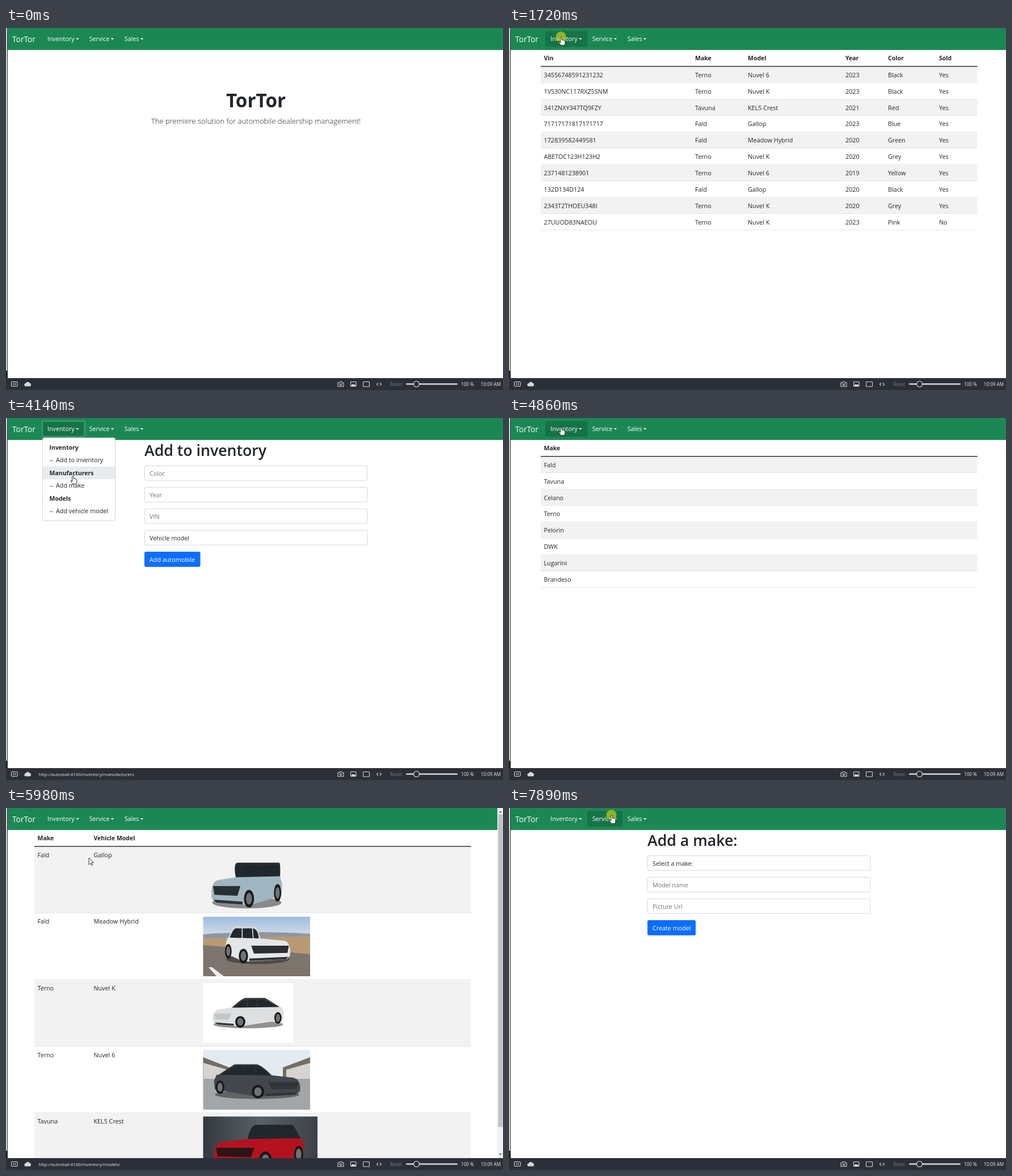
Write an HTML page that moves like this. It is 876x639 px and loops after 7990 ms.

```html
<!DOCTYPE html>
<html lang="en">
<head>
<meta charset="utf-8">
<title>Dealership dashboard</title>
<style>
html, body { margin: 0; width: 100%; height: 100%; overflow: hidden; background: #fff; }
svg { display: block; width: 876px; height: 639px; font: 10.75px "Open Sans", "Noto Sans", sans-serif; fill: #212529; }
text { white-space: pre; }
.b { font-weight: 700; font-size: 10.5px; }
.h { font-weight: 600; font-size: 26.7px; }
.w { fill: #fff; }
.p { fill: #6c757d; }
.s { font-size: 8.1px; fill: #eceef0; }
#link { font-size: 7.8px; }
</style>
</head>
<body>
<svg id="stage" viewBox="0 0 876 639"></svg>
<script>
const LOOP = 7990;

const text = (x, y, s, cls = '', more = '') => `<text x="${x}" y="${y}" class="${cls}" ${more}>${s}</text>`;
const rect = (x, y, w, h, fill, more = '') => `<rect x="${x}" y="${y}" width="${w}" height="${h}" fill="${fill}" ${more}/>`;
const path = (d, fill, more = '') => `<path d="${d}" fill="${fill}" ${more}/>`;
const oval = (x, y, rx, ry, fill, more = '') => `<ellipse cx="${x}" cy="${y}" rx="${rx}" ry="${ry}" fill="${fill}" ${more}/>`;
const group = (id, body) => `<g id="${id}">${body}</g>`;

// Striped rows below a bold header
function table(left, cols, head, rows, pitch) {
  const line = (y, h, c) => rect(left, y, 769.5, h, c);
  return head.map((s, i) => text(cols[i], 57, s, 'b')).join('') +
    rows.map((row, r) => {
      const y = 68 + r * pitch;
      return (r % 2 ? '' : line(y, pitch, '#f2f2f2')) + line(y + pitch - .8, .8, '#dee2e6') +
        row.split('|').map((s, i) => text(cols[i], y + 18.7, s)).join('');
    }).join('') + line(67, 1.4, '#212529');
}

// A leading * marks a select box, which has dark text
function form(title, fields, button, width) {
  const top = i => 84 + i * 38;
  const end = top(fields.length);
  return text(244, 67, title, 'h') +
    fields.map((s, i) =>
      rect(244.4, top(i) + .2, 392.4, 26, '#fff', 'rx="2.6" stroke="#ced4da" stroke-width=".9"') +
      text(253, top(i) + 17.6, s.replace('*', ''), s[0] == '*' ? '' : 'p')).join('') +
    rect(244, end, width, 26.7, '#0d6efd', 'rx="2.6"') + text(253, end + 17.6, button, 'w');
}

// Car facing left in a 100 x 50 box; a negative width flips it.
// hub: front wheel position, more when seen from the front; box: 0 sleek to 1 square.
function car(x, y, w, h, hub, box, body, roof, grille) {
  const base = hub * .6 + 3, front = base + 20 - 18 * box, back = 73 + 22 * box;
  const wheel = (cx, rx, cy) => oval(cx, cy, rx, 9, '#17191b') + oval(cx, cy, rx * .6, 6, '#6d7275');
  const cabin = (inset, fill) => path(
    `M${base + inset} 18Q${front - 6} ${3 + inset} ${front + inset} ${2 + inset}H${back - inset}Q${back + 2} ${3 + inset} ${96 - inset} 18Z`, fill);
  const pillar = k => front + (back - front) * k;
  return `<g transform="translate(${x} ${y}) scale(${w / 100} ${h / 50})">` +
    oval(50, 43, 48, 6, '#222', 'opacity=".5"') + cabin(0, roof) + cabin(2.5, '#20282e') +
    path(`M${pillar(.1)} 3L${pillar(.05)} 18M${pillar(.6)} 3V18`, 'none', `stroke="${roof}" stroke-width="1.5"`) +
    path(`M1 31Q2 22 9 20L${base} 17 96 16 99 24 98 36 ${hub} 46 6 43 1 38Z`, body) +
    path(`M3 26H${hub - 12}L${hub - 16} 36 5 35Z`, grille) +
    path(`M4 40L${hub - 9} 42V45L7 43Z`, '#303336') +
    wheel(86 + hub / 8, 5, 33) + wheel(hub, 7, 39) + '</g>';
}

const photos =
  car(361, 93, 127, 86, 53, 1, '#9fb6c1', '#262c32', '#2a2f33') +
  rect(347.5, 192, 188.5, 105, 'url(#sky)') +
  path('M347.5 223Q440 216 536 222V250H347.5Z', '#8d96a2') +
  path('M347.5 230L536 226V260L347.5 246Z', '#b79a74') +
  path('M347.5 242L536 258V297H347.5Z', '#7d756d') + path('M357 281H363L384 297H371Z', '#eee') +
  car(502, 206, -116, 71, 72, .6, '#e4e6e8', '#d2d5d8', '#2b2f33') +
  rect(347.5, 309, 158.5, 105.7, '#fff') +
  car(363, 333, 128, 57, 39, 0, '#dddfe0', '#35393c', '#c3c6c8') +
  rect(347.5, 427, 188.5, 105.5, '#e3eaf0') +
  path('M347.5 440L396 459V479H347.5ZM536 440L488 458V479H536Z', '#756d63') +
  path('M348 450L390 462V478H348ZM536 450L494 462V478H536Z', '#d5d4d0') +
  rect(347.5, 478, 188.5, 54.5, '#a3a6a8') +
  car(520, 450, -155, 65, 49, .1, '#41474c', '#2b3034', '#30353a') +
  rect(347.5, 544.6, 201.5, 106, 'url(#studio)') +
  car(365, 556, 162, 84, 57, .6, '#b5121f', '#22262a', '#2a1518');

const stock = [
  '34556748591231232|Terno|Nuvel 6|2023|Black|Yes', '1VS30NC117RXZ5SNM|Terno|Nuvel K|2023|Black|Yes',
  '341ZNXY347TQ9FZY|Tavuna|KEL5 Crest|2021|Red|Yes', '71717171817171717|Fald|Gallop|2023|Blue|Yes',
  '172839582449581|Fald|Meadow Hybrid|2020|Green|Yes', 'ABETOC123H123H2|Terno|Nuvel K|2020|Grey|Yes',
  '2371481238901|Terno|Nuvel 6|2019|Yellow|Yes', '132D134D124|Fald|Gallop|2020|Black|Yes',
  '2343T2THOEU348I|Terno|Nuvel K|2020|Grey|Yes', '27UUOD83NAEOU|Terno|Nuvel K|2023|Pink|No'
];
const makes = ['Fald', 'Tavuna', 'Celano', 'Terno', 'Pelorin', 'DWK', 'Lugarini', 'Brandeso'];
const models = ['Fald|Gallop', 'Fald|Meadow Hybrid', 'Terno|Nuvel K', 'Terno|Nuvel 6', 'Tavuna|KEL5 Crest'];

const scrollbar = rect(866, 0, 10, 618, '#f1f1f1') + rect(867.5, 11, 8, 552, '#c1c1c1') +
  path('M869 8L871.5 5 874 8ZM869 610L871.5 613 874 610Z', '#555');

const pages = [
  text(440.5, 140, 'TorTor', '', 'text-anchor="middle" font-size="33.2" font-weight="700"') +
  text(440.5, 169, 'The premiere solution for automobile dealership management!', '',
    'text-anchor="middle" font-size="13.1" font-weight="300"'),
  table(56, [61.5, 328, 421, 593, 668, 758], ['Vin', 'Make', 'Model', 'Year', 'Color', 'Sold'], stock, 28.9),
  form('Add to inventory', ['Color', 'Year', 'VIN', '*Vehicle model'], 'Add automobile', 98.5),
  table(56, [61.5], ['Make'], makes, 28.9),
  table(50, [55.5, 154.5], ['Make', 'Vehicle Model'], models, 117.6) + photos + scrollbar,
  form('Add a make:', ['*Select a make:', 'Model name', 'Picture Url'], 'Create model', 85)
];
const SCROLLED = 4;

const tab = (x, s, end) => text(x, 23, s, 'w') + path(`M${end} 18h5.4l-2.7 2.8Z`, '#fff');
const nav = rect(3, 0, 873, 38.8, '#1b8854', 'id="bar"') +
  rect(64, 5.5, 74.5, 27.5, '#157347', 'id="invBtn" rx="2.6" stroke="#3c996e"') +
  rect(138, 5.5, 62, 27.5, '#157347', 'id="serBtn" rx="2.6"') +
  text(11, 24.6, 'TorTor', 'w', 'font-size="13.7"') +
  tab(73, 'Inventory', 123.2) + tab(146.7, 'Service', 184.7) + tab(208.7, 'Sales', 236.8);

const items = ['Inventory', 'Add to inventory', 'Manufacturers', 'Add make', 'Models', 'Add vehicle model'];
const links = ['', 'add', 'manufacturers', 'manufacturers/add', 'models/', 'models/add'];
const ITEM_TOP = 40.5, ITEM_H = 22.5;
const menu = rect(64.5, 35, 128, 146.5, '#fff', 'rx="2.8" stroke="#cfcfcf" stroke-width=".9"') +
  rect(65, 0, 127, ITEM_H, '#e9ecef', 'id="hover"') +
  items.map((s, i) => {
    const y = ITEM_TOP + 15.2 + ITEM_H * i;
    return i % 2 ? text(76.5, y, '--') + text(88, y, s) : text(76.5, y, s, 'b');
  }).join('');

const outline = 'stroke="#d5dae0" stroke-width="1.1"';
const status = rect(0, 618, 876, 21, '#2b2f37') +
  rect(9.5, 624.5, 10.5, 8, 'none', `rx="1.5" ${outline}`) + path('M13.3 626.5v4M16.3 626.5v4', 'none', outline) +
  path('M35 632.5a2.6 2.6 0 0 1-.2-5.2 3.6 3.6 0 0 1 6.6-.7 3 3 0 0 1 .4 5.9Z', '#d5dae0') +
  path('M585 626.2h2l1.3-1.7h3.4l1.3 1.7h2v6.5h-10Z', 'none', outline) + oval(590, 629.3, 1.6, 1.6, 'none', outline) +
  rect(607.5, 624.5, 9.5, 8, 'none', `rx="1" ${outline}`) + path('M608 632l3-4 2 2 1.5-1.5 2 3.5Z', '#d5dae0') +
  rect(629.5, 624.5, 11, 8.5, 'none', `rx="1" ${outline}`) +
  path('M656 626.3l-2.5 2.5 2.5 2.5M659 626.3l2.5 2.5-2.5 2.5', 'none', outline) +
  text(677, 631.5, 'Reset', 's', 'style="fill:#747984"') +
  rect(705, 627.3, 91, 2.4, '#d3d6d9', 'rx="1.2"') +
  oval(723.5, 628.5, 5, 5, '#2b2f37', 'stroke="#e6e8ea" stroke-width="1.1"') +
  text(802, 631.5, '100 %', 's') + text(872, 631.5, '10:09 AM', 's', 'text-anchor="end"') +
  text(57.5, 631.5, '', 's', 'id="link"');

const edge = 'stroke="#222" stroke-width=".9"';
const arrow = path('M0 0V12L2.8 9.4 4.7 13.4 6.6 12.5 4.8 8.6H8.4Z', '#fff', edge);
const hand = path('M-1.2 1Q0-.8 1.2 1V5.2L4.4 5.3 6.8 6.5V11L5.5 14.5H-.5L-4 9.5Q-4.5 7.8-3 8L-1.2 9.8Z', '#fff', edge);

const fade = (id, dir, colors) => `<linearGradient id="${id}" ${dir}>` +
  colors.map((c, i) => `<stop offset="${i / (colors.length - 1)}" stop-color="${c}"/>`).join('') + '</linearGradient>';

stage.innerHTML = '<defs>' + fade('sky', 'x2="0" y2=".4"', ['#9cbde0', '#e3e5e5']) +
  fade('studio', '', ['#33393f', '#596067', '#3b4147']) + '</defs>' +
  pages.map((p, i) => group('page' + i, p)).join('') +
  rect(0, 0, 2, 605, '#d4d4d4') + rect(2, 0, 1, 618, '#333') + rect(0, 605, 2.5, 13, '#222') +
  nav + group('menu', menu) + status +
  oval(-.5, -.8, 9, 9, '#c8d214', 'id="dot" opacity=".68"') + group('arrow', arrow) + group('hand', hand);

const $ = id => document.getElementById(id);
const show = (id, on) => $(id).style.display = on ? '' : 'none';

// Each visit opens the menu at `nav`, moves over `stops` (time, x, y) and clicks the last one.
// A click takes effect one BEAT later.
const BEAT = 100;
const visits = [
  { nav: 510, stops: [[830, 103, 52]], click: 1130 },
  { nav: 1720, stops: [[2020, 113, 69]], click: 2540 },
  { nav: 3140, stops: [[4140, 118, 102]], click: 4340 },
  { nav: 4960, stops: [[5470, 132, 155], [5570, 132, 155], [5670, 131, 146]], click: 5770 },
  { via: [5980, 146, 88], nav: 6480, stops: [[7150, 131, 166]], click: 7290 }
];
const LAST_CLICK = 7890;
const clicks = [...visits.flatMap(v => [v.nav, v.click]), LAST_CLICK];

const track = visits.flatMap(({ via, nav, stops, click }) => {
  const [, x, y] = stops[stops.length - 1];
  return [...(via ? [via, [via[0] + BEAT, via[1], via[2]]] : []),
    [nav - BEAT, 92, 16], [nav + BEAT, 92, 16], ...stops,
    [click + BEAT * (click == 5770 ? 1 : 2), x, y]];
});
track.push([LAST_CLICK, 181, 13], [LOOP, 181, 13]);

function pointer(t) {
  const i = Math.max(1, track.findIndex(k => k[0] > t));
  const [a, b] = [track[i - 1], track[i]];
  const f = Math.max(0, (t - a[0]) / (b[0] - a[0]));
  return [a[1] + (b[1] - a[1]) * f, a[2] + (b[2] - a[2]) * f];
}

const menuOpen = t => visits.some(v => t >= v.nav + BEAT && t < v.click + BEAT);

function itemAt(t) {
  const i = Math.floor((pointer(t)[1] - ITEM_TOP) / ITEM_H);
  return menuOpen(t) && i in items ? i : -1;
}

function draw(t) {
  const [x, y] = pointer(t);
  const here = t >= 400, open = menuOpen(t), item = itemAt(t);
  const page = visits.filter(v => t >= v.click + BEAT).length;
  const overNav = here && y > 5 && y < 33;
  const pointing = overNav || item >= 0;

  pages.forEach((_, i) => show('page' + i, i == page));
  $('bar').setAttribute('width', page == SCROLLED ? 863 : 873);
  show('menu', open);
  show('hover', item >= 0);
  $('hover').setAttribute('y', ITEM_TOP + item * ITEM_H);
  show('invBtn', open || overNav && x < 138);
  $('invBtn').setAttribute('stroke-width', open ? 2.4 : 0);
  show('serBtn', overNav && x >= 138);

  // The link hint lingers briefly after the pointer leaves an item
  const hint = item >= 0 ? item : itemAt(t - 2.1 * BEAT);
  $('link').textContent = hint < 0 ? '' : 'http://autostall:4100/inventory/' + links[hint];

  show('dot', clicks.some(c => t >= c && t < c + BEAT));
  show('arrow', here && !pointing);
  show('hand', here && pointing);
  for (const id of ['arrow', 'hand', 'dot']) $(id).setAttribute('transform', `translate(${x} ${y})`);
}

const start = performance.now();
function tick() {
  draw((performance.now() - start) % LOOP);
  requestAnimationFrame(tick);
}
tick();
</script>
</body>
</html>
```
